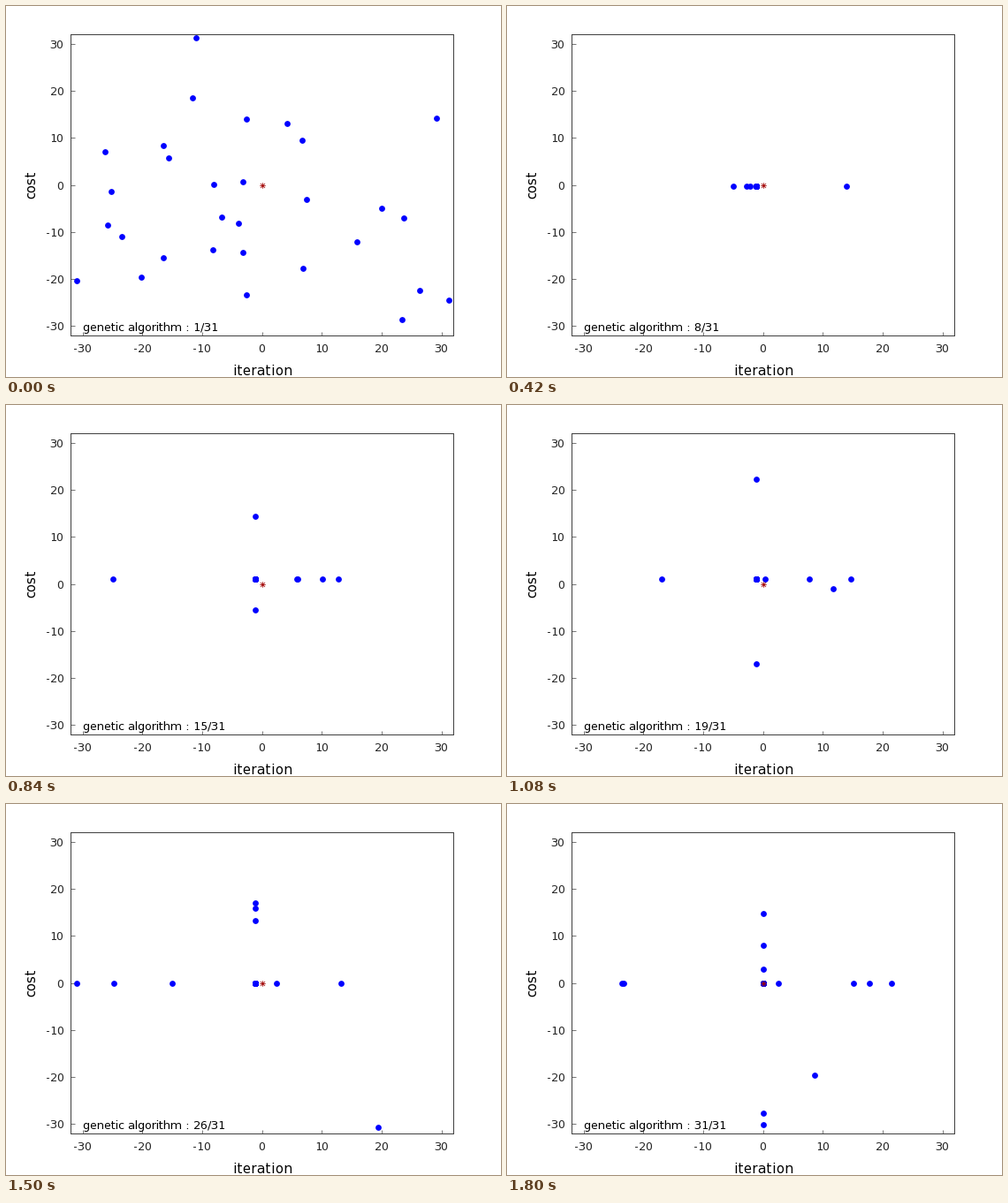
Recreate the animation shown at these times as a matplotlib script. Size 560 by 420 pixels, loop 1.86 s.

```python
import numpy as np
import matplotlib.pyplot as plt
from matplotlib.animation import FuncAnimation

W, H, DPI = 560, 420, 100
PX = 72 / DPI  # one pixel in points
GENS, SIZE = 31, 30
LIMIT = 32
SEED = 7

# Whole-pixel glyph advances
plt.rcParams.update({"font.family": "DejaVu Sans",
                     "text.hinting": "force_autohint",
                     "text.hinting_factor": 1})

# Best individual from a given generation on
BEST = {1: (-1.05, 1.35), 7: (-1.05, -0.35), 10: (-1.05, 0.95),
        22: (-1.05, -0.15), 29: (0.1, -0.1)}


def population(gen):
    """Copies of the best whose genes mutate ever less often."""
    rng = np.random.default_rng(SEED + gen)
    best = BEST[max(g for g in BEST if g <= gen)]
    rate = 0.16 + 0.84 * 0.35 ** (gen - 1)
    genes = rng.uniform(-LIMIT, LIMIT, (SIZE, 2))
    mutate = rng.random((SIZE, 2)) < rate
    return np.where(mutate, genes, best)


def place(x, y):
    """Pixels from the top left to figure fractions."""
    return x / W, 1 - y / H


fig = plt.figure(figsize=(W / DPI, H / DPI), dpi=DPI, facecolor="white")
ax = fig.add_axes([*place(73.05, 373.05), 433 / W, 341 / H])
ticks = range(-30, 31, 10)
names = [str(v) for v in ticks]
ax.set(xlim=(-LIMIT, LIMIT), ylim=(-LIMIT, LIMIT))
ax.set_xticks(ticks, names)
ax.set_yticks(ticks, names)
ax.tick_params(direction="in", length=4.5 * PX, width=0.7 * PX,
               color="#404040", labelcolor="#262626", labelsize=13.33 * PX)
ax.tick_params(axis="x", pad=9.2 * PX)
ax.tick_params(axis="y", pad=7.5 * PX)
for spine in ax.spines.values():
    spine.set(linewidth=PX, color="#404040")

label = dict(fontsize=14.67 * PX, ha="center", va="baseline",
             rotation_mode="anchor")
fig.text(*place(290, 418), "iteration", **label)
fig.text(*place(33, 202), "cost", rotation=90, **label)
caption = fig.text(*place(87, 368), "", fontsize=13.33 * PX, va="baseline")

dots = ax.scatter([], [], s=(6.8 * PX) ** 2, color="blue", linewidths=0,
                  clip_on=False, snap=False, zorder=3)
for marker, size in (("+", 6.5), ("x", 5)):
    ax.scatter([0], [0], s=(size * PX) ** 2, marker=marker, color="#a00000",
               linewidths=0.8 * PX, snap=False, zorder=4)


def update(i):
    dots.set_offsets(population(i + 1))
    caption.set_text(f"genetic algorithm : {i + 1}/{GENS}")
    return dots, caption


anim = FuncAnimation(fig, update, frames=GENS, interval=60, repeat=True,
                     repeat_delay=0)
plt.show()
```
